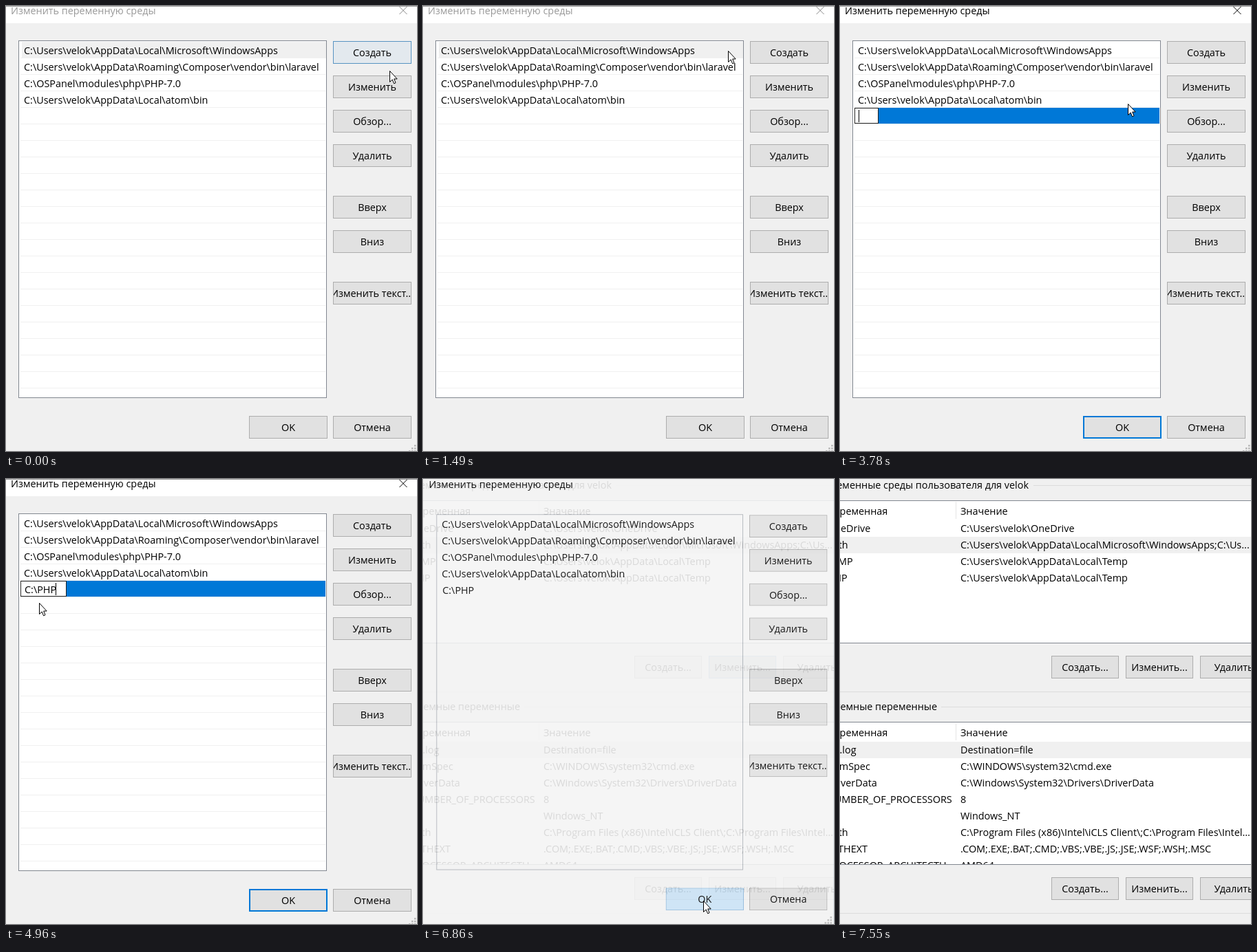
Recreate the animation shown at these times as an HTML page. Size 597x647 px, loop 7.64 s.

```html
<!DOCTYPE html>
<html lang="ru">
<head>
<meta charset="utf-8">
<style>
html, body { margin: 0; width: 597px; height: 647px; overflow: hidden; background: #f0f0f0; }
svg { display: block; }
text { font: 14.4px "Open Sans", "Noto Sans", sans-serif; white-space: pre; }
</style>
</head>
<body>
<svg id="stage" width="597" height="647"></svg>
<script>
const LOOP = 7640, STEP = 87.5;
const HOME = 'C:\\Users\\velok';
const APPS = HOME + '\\AppData\\Local\\Microsoft\\WindowsApps';

const rect = (x, y, w, h, fill, more = '') =>
  `<rect x="${x}" y="${y}" width="${w}" height="${h}" fill="${fill}" ${more}/>`;
const rule = (x1, x2, y, color, more = '') =>
  `<path d="M${x1} ${y}H${x2}" stroke="${color}" ${more}/>`;
const text = (x, y, s, more = '') => `<text x="${x}" y="${y}" ${more}>${s}</text>`;
const repeat = (n, make) => Array.from({ length: n }, (_, i) => make(i)).join('');
const button = (x, y, label, w = 114, id = '') =>
  `<svg x="${x}" y="${y}" width="${w}" height="33">` +
  rect(.5, .5, w - 1, 32, '#e1e1e1', `stroke="#adadad" id="${id}"`) +
  `<svg x="1" width="${w - 2}" height="33">${text(w / 2 - 1, 22, label, 'text-anchor="middle"')}</svg></svg>`;

// Parent window with two variable tables
function table(y, title, selected, rows) {
  const entries = rows.map(([name, value], i) =>
    text(-19, y + 46 + 24 * i, name) + text(175, y + 46 + 24 * i, value)).join('');
  return text(-19, y - 17, title) +
    rect(-5, y + .5, 610, 207, '#fff', 'stroke="#828790"') +
    rect(-4, y + 29 + 24 * selected, 610, 24, '#f0f0f0') +
    rect(168, y + 2, 1, 25, '#e5e5e5') +
    text(-19, y + 21, 'Переменная') + text(175, y + 21, 'Значение') + entries +
    rect(0, y + 207, 597, 115, '#f0f0f0') + rule(0, 597, y + 207.5, '#828790') +
    button(307, y + 226, 'Создать...', 98) +
    button(415, y + 226, 'Изменить...', 98, 'edit' + y) +
    button(523, y + 226, 'Удалить', 98) + rule(0, 597, y + 278.5, '#dcdcdc');
}
const group = (y, s) => text(0, y, s, 'text-anchor="end"');

const parent = rect(0, 0, 597, 647, '#f0f0f0') +
  rule(281, 597, 9.5, '#dcdcdc') +
  table(31, '', 1, [
    ['OneDrive', HOME + '\\OneDrive'],
    ['Path', APPS + ';C:\\Us...'],
    ['TEMP', HOME + '\\AppData\\Local\\Temp'],
    ['TMP', HOME + '\\AppData\\Local\\Temp']]) +
  rule(147, 597, 331.5, '#dcdcdc') +
  table(353, '', 0, [
    ['asl.log', 'Destination=file'],
    ['ComSpec', 'C:\\WINDOWS\\system32\\cmd.exe'],
    ['DriverData', 'C:\\Windows\\System32\\Drivers\\DriverData'],
    ['NUMBER_OF_PROCESSORS', '8'],
    ['OS', 'Windows_NT'],
    ['Path', 'C:\\Program Files (x86)\\Intel\\iCLS Client\\;C:\\Program Files\\Intel...'],
    ['PATHEXT', '.COM;.EXE;.BAT;.CMD;.VBS;.VBE;.JS;.JSE;.WSF;.WSH;.MSC'],
    ['PROCESSOR_ARCHITECTU...', 'AMD64']]) +
  text(274, 14, 'Переменные среды пользователя для velok', 'text-anchor="end"') +
  text(141, 336, 'Системные переменные', 'text-anchor="end"');

// Dialog with the path list
const paths = [APPS, HOME + '\\AppData\\Roaming\\Composer\\vendor\\bin\\laravel',
  'C:\\OSPanel\\modules\\php\\PHP-7.0', HOME + '\\AppData\\Local\\atom\\bin'];
const side = ['Создать', 'Изменить', 'Обзор...', 'Удалить', 'Вверх', 'Вниз', 'Изменить текст...']
  .map((label, i) => button(475, 51 + 50 * i + 25 * ((i > 3) + (i > 5)), label, 114, i ? '' : 'create')).join('');
const grip = repeat(3, r => repeat(r + 1, c => rect(593 - 4 * c, 638 + 4 * r, 2.5, 2.5, '#b8b8b8')));

const dialog = rect(-3, -9, 602, 661, '#f0f0f0', 'id="body" stroke="#7aa7d0"') +
  rect(-2, -8, 600, 33, '#fff', 'id="bar"') + rule(0, 597, .5, '#9a9a9a', 'id="edge"') +
  `<g id="title">${text(7, 12, 'Изменить переменную среды')}</g>` +
  '<path id="close" d="M571.5 1L582.5 12M582.5 1L571.5 12"/>' +
  rect(18.5, 50.5, 447, 519, '#fff', 'id="list" stroke="#828790"') +
  rect(23, 52, 442, 24, '#f0f0f0', 'id="first"') +
  `<g id="grid">${repeat(21, i => rule(21, 464, 75.5 + 24 * i, '#f0f0f0'))}</g>` +
  paths.map((s, i) => text(26, 70 + 24 * i, s)).join('') +
  '<g id="row">' + rect(21, 148, 443, 23, '#0078d7') +
  rect(21.5, 148.5, 34, 22, '#fff', 'id="field" stroke="#222"') +
  rect(27, 151, 1, 18, '#000', 'id="caret"') + '</g>' +
  text(27, 166, 'C:\\PHP', 'id="typed"') +
  side + button(353, 596, 'OK', 114, 'ok') + button(475, 596, 'Отмена') + grip;

document.getElementById('stage').innerHTML = parent + `<g id="dialog">${dialog}</g>` +
  '<path id="cursor" d="M.5 .5V16.5L4.2 13 6.6 18.8 9 17.7 6.7 12H11.2Z" fill="#fff" stroke="#000"/>';

const el = {};
document.querySelectorAll('[id]').forEach(e => { el[e.id] = e; });
const show = (e, on) => e.setAttribute('display', on ? 'inline' : 'none');
const set = (e, attrs) => { for (const k in attrs) e.setAttribute(k, attrs[k]); };

// Pointer circles the first button, then makes these moves
const moves = [
  { from: 2100, to: 2360, x: 523, y: 74 },
  { from: 2960, to: 3410, x: 428, y: 139 },
  { from: 3690, to: 3760, x: 418, y: 142 },
  { from: 3800, to: 4320, x: 73, y: 170 },
  { from: 4430, to: 4690, x: 48, y: 180 },
  { from: 5430, to: 6210, x: 346, y: 503 },
  { from: 6240, to: 6650, x: 407, y: 613 },
  { from: 7080, to: 7200, x: 407, y: 660 }];
const ease = k => k * k * (3 - 2 * k);
const progress = (t, from, to) => Math.min(1, Math.max(0, (t - from) / (to - from)));

function pointer(t) {
  const angle = (54 + .3275 * t) * Math.PI / 180;
  let x = 515 + 72 * Math.cos(angle), y = 66 + 35 * Math.sin(angle);
  for (const m of moves) {
    const k = ease(progress(t, m.from, m.to));
    x += (m.x - x) * k;
    y += (m.y - y) * k;
  }
  return [x, y];
}

// Hover fades in and out over a quarter second
function hover(t, bx, by) {
  let sum = 0;
  for (let d = 0; d <= 250; d += 50) {
    const [x, y] = pointer(t - d);
    if (x >= bx && x < bx + 114 && y >= by && y < by + 33) sum++;
  }
  return sum / 6;
}
const channels = hex => hex.match(/\w\w/g).map(c => parseInt(c, 16));
function mix(a, b, k) {
  const to = channels(b);
  return `rgb(${channels(a).map((v, i) => Math.round(v + (to[i] - v) * k))})`;
}
const face = k => mix('#e1e1e1', '#e5f1fb', k);
const rim = k => mix('#adadad', '#0078d7', k);

function draw(t) {
  const q = Math.floor((t + 10) / STEP) * STEP;
  const active = t >= 2700, editing = t >= 2780, typed = t >= 4960, closing = t >= 6860;

  const fade = closing ? (q - 6790) / 210 : 0;
  set(el.dialog, {
    opacity: Math.max(0, 1 - .65 * fade),
    transform: `translate(276 283) scale(${1 - .031 * fade}) translate(-276 -283)`
  });
  set(el.body, { fill: closing ? '#f4f4f4' : '#f0f0f0' });
  set(el.list, { fill: closing ? '#f4f4f4' : '#fff', stroke: closing ? '#b0b4ba' : '#828790' });
  set(el.title, { fill: active ? '#000' : '#999' });
  set(el.close, { stroke: active ? '#000' : '#888' });
  for (const part of [el.bar, el.edge, el.close, el.grid]) show(part, !closing);
  show(el.first, !editing);
  show(el.row, editing && !closing);
  show(el.typed, typed);
  set(el.field, { width: typed ? 66 : 34 });
  set(el.caret, { x: typed ? 72 : 27 });
  show(el.caret, Math.floor((t - (typed ? 4960 : 2700)) / 530) % 2 === 0);

  const pressed = active && !editing, lit = hover(q, 475, 51);
  set(el.create, { fill: pressed ? '#cce4f7' : face(lit), stroke: pressed ? '#005499' : rim(lit) });

  const frame = editing && !closing ? 2 : 1, inset = frame / 2;
  set(el.ok, {
    x: inset, y: inset, width: 114 - frame, height: 33 - frame, 'stroke-width': frame,
    fill: closing ? '#cce4f7' : face(hover(q, 353, 596)),
    stroke: closing ? '#8fb8dc' : rim(editing ? 1 : 0)
  });

  const focus = t < 7200 ? 1 : t < 7550 ? .3 : 0;
  set(el.edit31, { fill: mix('#e1e1e1', '#c3c8ce', focus), stroke: mix('#adadad', '#86a8cc', focus) });
  set(el.cursor, { transform: `translate(${pointer(q).map(Math.round)})` });
}

const start = performance.now();
function tick() {
  draw((performance.now() - start) % LOOP);
  requestAnimationFrame(tick);
}
tick();
</script>
</body>
</html>
```
